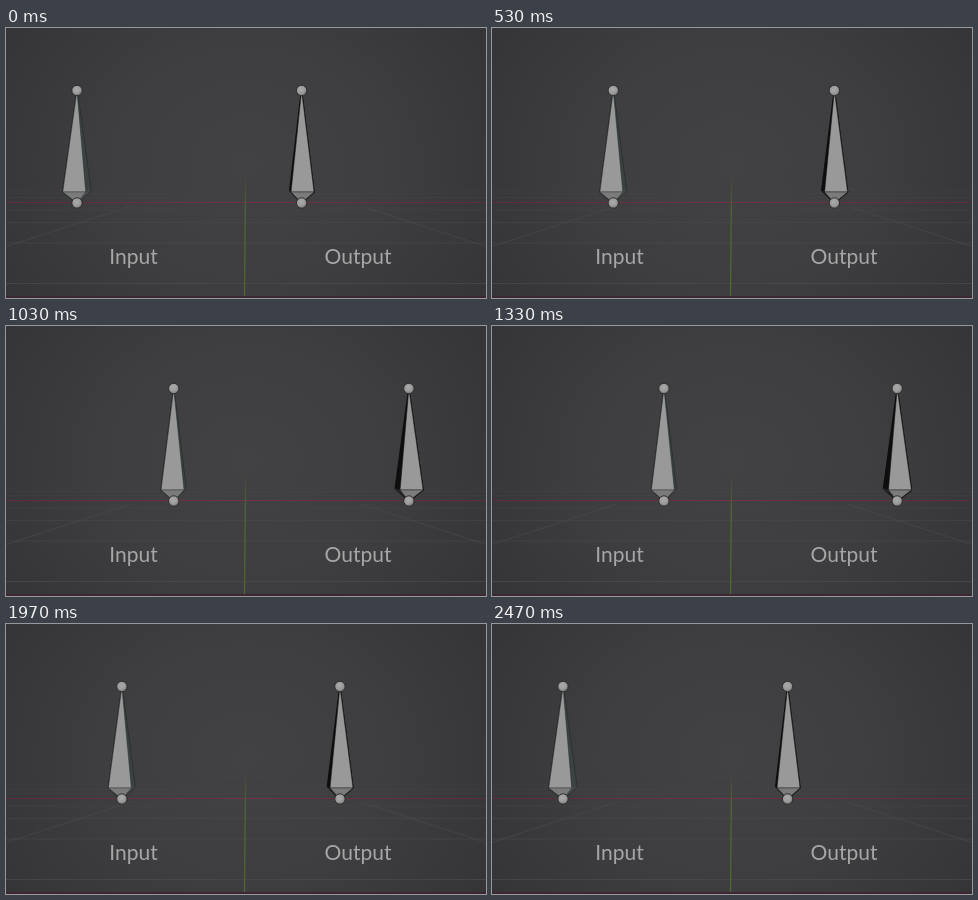
These frames come from a looping animation (480x270 px, 2510 ms). An HTML page:

```html
<!DOCTYPE html>
<html lang="en">
<head>
<meta charset="utf-8">
<title>Input and output bones</title>
<style>
  html, body { margin: 0; width: 100%; height: 100%; overflow: hidden; background: #3b3a3c; }
  svg { display: block; width: 100vw; height: 100vh; }
  text { font: 21px Lato, "Open Sans", sans-serif; fill: #a6a6a7; text-anchor: middle; }
</style>
</head>
<body>
<svg id="stage" viewBox="0 0 480 270">
  <defs>
    <radialGradient id="bg" gradientUnits="userSpaceOnUse" cx="240" cy="135" r="285" gradientTransform="translate(0 20) scale(1 .85)">
      <stop offset="0" stop-color="#424143"/>
      <stop offset=".5" stop-color="#3e3d3f"/>
      <stop offset="1" stop-color="#353436"/>
    </radialGradient>
    <linearGradient id="green" gradientUnits="userSpaceOnUse" x1="0" y1="146" x2="0" y2="185">
      <stop offset="0" stop-color="#4d6b2c" stop-opacity="0"/>
      <stop offset="1" stop-color="#4d6b2c"/>
    </linearGradient>
    <linearGradient id="red" gradientUnits="userSpaceOnUse" x1="0" y1="0" x2="480" y2="0">
      <stop offset="0" stop-color="#5f2c3c"/>
      <stop offset=".5" stop-color="#713245"/>
      <stop offset="1" stop-color="#5f2c3c"/>
    </linearGradient>
    <radialGradient id="ball" cx=".45" cy=".4" r=".6">
      <stop offset="0" stop-color="#aaaaaa"/>
      <stop offset=".6" stop-color="#9c9c9c"/>
      <stop offset="1" stop-color="#777777"/>
    </radialGradient>
  </defs>
  <rect width="480" height="270" fill="url(#bg)"/>
  <g id="grid" stroke="#4b4a4c" fill="none"></g>
  <path d="M0 174.5H480" stroke="url(#red)"/>
  <path d="M239.6 146L238.5 270" stroke="url(#green)" stroke-width="1.2"/>
  <rect y="268" width="480" height="2" fill="#3d2831"/>
  <g id="bones"></g>
  <text x="127.5" y="236">Input</text>
  <text x="352" y="236">Output</text>
</svg>
<script>
const LOOP = 2510, TOP = 62.5, BASE = 175, MID = 239, TRAVEL = 112.2;
const UP = 29, DOWN = 30;
const $ = id => document.getElementById(id);

function add(parent, tag, attrs) {
  const el = document.createElementNS("http://www.w3.org/2000/svg", tag);
  for (const key in attrs) el.setAttribute(key, attrs[key]);
  return parent.appendChild(el);
}

function drawGrid() {
  const line = (d, o) => add($("grid"), "path", { d, "stroke-opacity": o });
  [[255.5, .75], [215, .6], [194.5, .5], [182, .4]].forEach(([y, o]) => line(`M0 ${y}H480`, o));
  for (let i = 1; i < 6; i++) line(`M0 ${141 + 1 / (.02985 + .0054 * i)}H480`, .4 - i * .06);
  line("M0 218.5L125 178", .65);
  line("M480 218.5L355 178", .65);
}

// Symmetric ease with flat ends and handles of length h.
function ease(u, h = .38) {
  let lo = 0, hi = 1, s = .5;
  for (let i = 0; i < 24; i++) {
    s = (lo + hi) / 2;
    const x = 3 * h * s * (1 - s) ** 2 + 3 * (1 - h) * s * s * (1 - s) + s ** 3;
    if (x < u) lo = s; else hi = s;
  }
  return s * s * (3 - 2 * s);
}

function makeBone({ side, low, edge }) {
  const g = add($("bones"), "g", { "stroke-linejoin": "round" });
  const face = (fill, stroke, width) => add(g, "polygon", { fill, stroke, "stroke-width": width });
  const faces = {
    outline: face(edge, edge, 1.6),
    backTop: face(side, side, .4),
    backLow: face(low, low, .4),
    frontTop: face("#999999", edge, .5),
    frontLow: face("#7b7b7b", edge, .4)
  };
  const balls = [TOP, BASE].map(cy =>
    add(g, "circle", { cy, r: 5.2, fill: "url(#ball)", stroke: "#29292a", "stroke-width": .9 }));

  return x => {
    const shift = (x - MID) * .0165;
    const tip = [x, TOP], foot = [x, BASE];
    const fl = [x + shift - 11.5, 164], fr = [x + shift + 11.5, 164];
    const bl = [x - shift - 10.9, 162.5], br = [x - shift + 10.9, 162.5];
    const left = fl[0] < bl[0] ? fl : bl, right = fr[0] > br[0] ? fr : br;
    const shapes = {
      outline: [tip, right, foot, left],
      backTop: [tip, br, fr, fl, bl],
      backLow: [bl, fl, fr, br, foot],
      frontTop: [tip, fr, fl],
      frontLow: [fl, fr, foot]
    };
    for (const name in shapes) faces[name].setAttribute("points", shapes[name].join(" "));
    balls.forEach(b => b.setAttribute("cx", x));
  };
}

drawGrid();
const moveInput = makeBone({ side: "#3a4242", low: "#4c5050", edge: "#252b2b" });
const moveOutput = makeBone({ side: "#0e0e0f", low: "#262627", edge: "#121213" });

// 24 poses per second, shown on a 30 per second clock in 10 ms ticks.
function poseAt(ms) {
  const tick = Math.floor((Math.floor(ms / 10) + .5) * .3);
  return Math.round(tick * .8);
}

const start = performance.now();
function render(now) {
  const pose = poseAt(Math.max(0, now - start) % LOOP);
  const u = pose <= UP ? pose / UP : (UP + DOWN - pose) / DOWN;
  moveInput(71 + TRAVEL * u);
  moveOutput(295.6 + TRAVEL * ease(u));
  requestAnimationFrame(render);
}
render(start);
</script>
</body>
</html>
```
